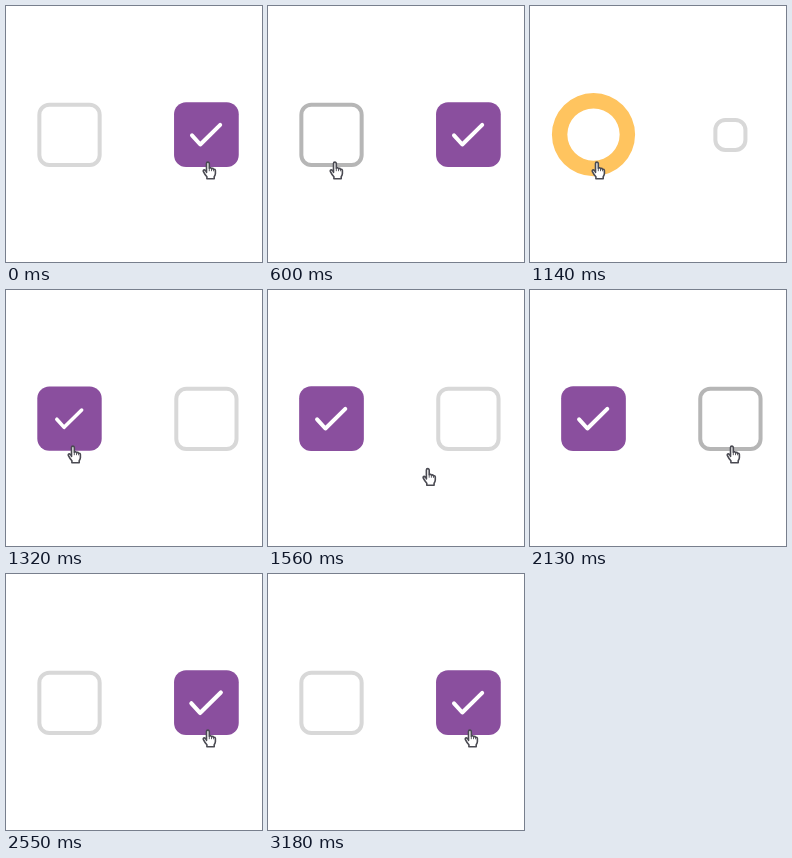
Recreate the animation shown at these times as an HTML page with a canvas. Size 256 by 256 pixels, loop 3240 ms.

```html
<!DOCTYPE html>
<html lang="en">
<head>
<meta charset="utf-8">
<title>Checkbox toggle</title>
<style>
html, body { margin: 0; width: 100%; height: 100%; overflow: hidden; background: #fff; }
canvas { display: block; width: 256px; height: 256px; }
</style>
</head>
<body>
<canvas id="stage" width="256" height="256"></canvas>
<script>
const ctx = document.getElementById('stage').getContext('2d');
const LOOP = 3240, STEP = 30;
const PURPLE = '#8a4f9e', ORANGE = '#ffc45f';
const LEFT = 63.5, RIGHT = 200.4, MID = 128.6;
const FULL = 64.7, EMPTY = 64.3, RING = 41.6;
const CLICK_LEFT = 990, CLICK_RIGHT = 2130;

const clamp = v => Math.min(1, Math.max(0, v));
const span = (t, from, to) => clamp((t - from) / (to - from));
const easeOut = p => 1 - (1 - p) ** 3;
const easeBack = p => 1 + 2.2 * (p - 1) ** 3 + 1.2 * (p - 1) ** 2;

// Quick start, long settle: cubic-bezier(.2, 0, 0, 1)
function glide(p) {
  let lo = 0, hi = 1, s = 0.5;
  for (let i = 0; i < 20; i++) {
    s = (lo + hi) / 2;
    const x = 0.6 * s * (1 - s) ** 2 + s ** 3;
    if (x < p) lo = s; else hi = s;
  }
  return 3 * (1 - s) * s * s + s ** 3;
}

function roundRect(size, radius) {
  ctx.beginPath();
  ctx.roundRect(-size / 2, -size / 2, size, size, Math.max(0, Math.min(radius, size / 2)));
}

function emptyBox(size, hover) {
  if (size < 1) return;
  const g = Math.round(216 - 34 * hover);
  const line = Math.min(4, size / 2);
  ctx.strokeStyle = `rgb(${g},${g},${g})`;
  ctx.lineWidth = line;
  ctx.save();
  ctx.translate(0, 0.3);
  roundRect(size - line, 10);
  ctx.stroke();
  ctx.restore();
}

function tick(scale) {
  if (scale <= 0) return;
  ctx.save();
  ctx.scale(scale, scale);
  ctx.strokeStyle = '#fff';
  ctx.lineWidth = 4;
  ctx.lineCap = ctx.lineJoin = 'round';
  ctx.beginPath();
  ctx.moveTo(-14.4, 0.7);
  ctx.lineTo(-6.1, 9.9);
  ctx.lineTo(13.8, -9.7);
  ctx.stroke();
  ctx.restore();
}

function fullBox(size, tickScale) {
  if (size < 1) return;
  ctx.fillStyle = PURPLE;
  roundRect(size, 12);
  ctx.fill();
  tick(tickScale);
}

function ring(outer, inner) {
  if (outer - inner < 0.3) return;
  ctx.fillStyle = ORANGE;
  ctx.beginPath();
  ctx.arc(0, 0, outer, 0, Math.PI * 2);
  ctx.arc(0, 0, inner, 0, Math.PI * 2, true);
  ctx.fill();
}

// t counts from the click
function turnOn(t) {
  const shrink = 1 - span(t, 0, 90);
  emptyBox(EMPTY * shrink, shrink);
  ring(RING * easeOut(span(t, 30, 150)), RING * easeOut(span(t, 105, 265)));
  const grow = easeOut(span(t, 180, 360));
  const pop = easeBack(span(t, 255, 480));
  fullBox(FULL * grow, t < 255 ? 0 : pop);
}

function turnOff(t) {
  const shrink = 1 - span(t, 0, 90);
  fullBox(FULL * shrink, shrink);
  emptyBox(EMPTY * easeOut(span(t, 90, 360)), 0);
}

function at(x, draw) {
  ctx.save();
  ctx.translate(x, MID);
  draw();
  ctx.restore();
}

const hand = new Path2D('M4 11V2.1a1.4 1.4 0 0 1 2.8 0V6.8q1.3-1 2.2.4q1.4-.7 2.1.7q1.6-.4 1.8 1.3v3q0 1.6-1.2 3.2v2H4.4v-2q-2.2-2.4-3.6-5.4q-.3-1.6 1.2-1.5q1 .5 2 2z');
const knuckles = new Path2D('M6.8 6.8v3M9 7.2v2.6M11.1 7.9v2');

function cursor(t) {
  const p = 1 - glide(span(t, 40, 540)) + glide(span(t, 1410, 1910));
  const dip = 23 + 2 * Math.sin(Math.PI * p);
  ctx.save();
  ctx.translate(61.5 + 135 * p, 155.4 + dip * (1 - Math.abs(2 * p - 1) ** 2.5));
  ctx.fillStyle = '#fff';
  ctx.strokeStyle = '#4a4a52';
  ctx.lineJoin = 'round';
  ctx.lineWidth = 1.6;
  ctx.fill(hand);
  ctx.stroke(hand);
  ctx.lineWidth = 0.9;
  ctx.stroke(knuckles);
  ctx.restore();
}

function render(t) {
  ctx.fillStyle = '#fff';
  ctx.fillRect(0, 0, 256, 256);

  at(LEFT, () => {
    if (t < CLICK_LEFT) emptyBox(EMPTY, span(t, 330, 480));
    else if (t < CLICK_RIGHT) turnOn(t - CLICK_LEFT);
    else turnOff(t - CLICK_RIGHT);
  });
  at(RIGHT, () => {
    if (t < CLICK_LEFT) fullBox(FULL, 1);
    else if (t < 1650) turnOff(t - CLICK_LEFT);
    else if (t < CLICK_RIGHT) emptyBox(EMPTY, span(t, 1700, 1850));
    else turnOn(t - CLICK_RIGHT);
  });
  cursor(t);
}

const start = performance.now();
function loop() {
  const t = (performance.now() - start) % LOOP;
  render(Math.floor(t / STEP) * STEP);
  requestAnimationFrame(loop);
}
loop();
</script>
</body>
</html>
```
